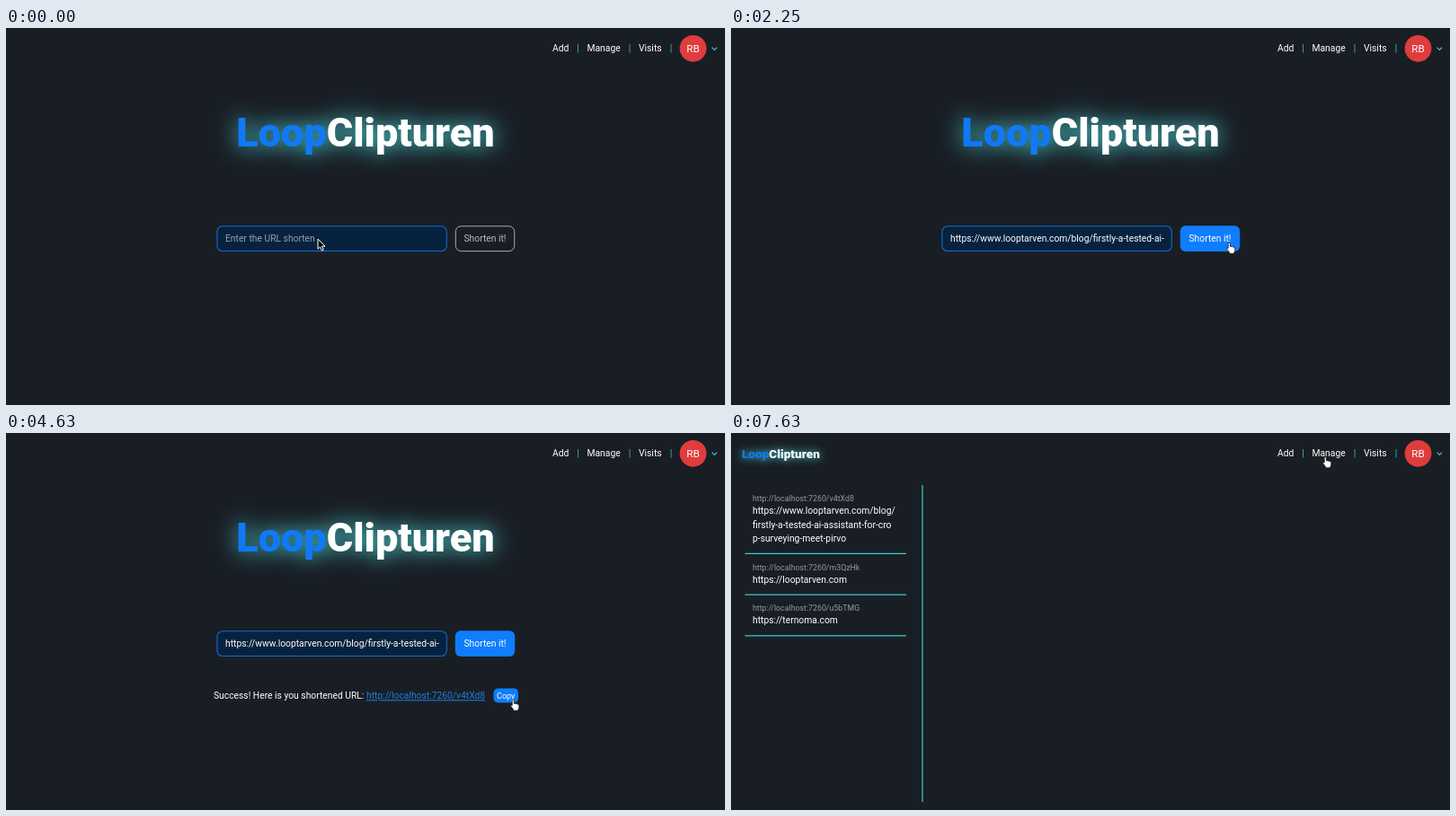
An HTML page for the animation above (8000 ms loop, 800 px wide and 420 px high).

```html
<!DOCTYPE html>
<html lang="en">
<head>
<meta charset="utf-8">
<title>Link shortener</title>
<style>
  html, body { margin: 0; width: 100%; height: 100%; overflow: hidden; background: #191e25; }
  svg { display: block; width: 800px; height: 420px; font: 10.3px Roboto, sans-serif; fill: #fff; }
  .logo { font-weight: 800; }
  .logo tspan { fill: #1179f8; }
  .teal { fill: #3cc8cc; }
  .line { stroke: #3cc8cc; stroke-width: 1.2; fill: none; }
  .small { font-size: 8.8px; fill: #949a9f; }
  .blue { fill: #0f7dfd; }
  .outlined { fill: none; stroke: #a9acb0; }
  .mid { text-anchor: middle; }
  #cursors path { stroke-linejoin: round; }
</style>
</head>
<body>
<svg viewBox="0 0 800 420">
  <defs><clipPath id="fieldClip"><rect x="243.5" y="222" width="238.5" height="25"/></clipPath></defs>

  <g id="nav">
    <text x="608" y="26.3">Add</text>
    <text x="646.5" y="26.3">Manage</text>
    <text x="704" y="26.3">Visits</text>
    <g class="teal mid">
      <text x="636.5" y="26">|</text><text x="694" y="26">|</text><text x="740" y="26">|</text>
    </g>
    <circle cx="764.5" cy="22.8" r="14.9" fill="#df3c3e"/>
    <text class="mid" x="764.5" y="26.9" font-size="11.6">RB</text>
    <path class="line" d="M785.5 21.7l2.8 2.8 2.8-2.8"/>
  </g>

  <g id="home">
    <text class="logo mid" x="400" y="132" font-size="45"
      style="filter:drop-shadow(0 0 12px #4fe6e6)"><tspan>Loop</tspan>Clipturen</text>

    <g id="field">
      <rect id="ring" x="233.7" y="219.7" width="257.6" height="29.6" rx="6.5" fill="none" stroke="#fff" stroke-width="1.6"/>
      <rect x="234.9" y="220.8" width="255.4" height="27.7" rx="6" fill="#07223e" stroke="#1869ca" stroke-width="1.1"/>
      <g clip-path="url(#fieldClip)">
        <text id="hint" x="244" y="238" fill="#93a2b1">Enter the URL shorten</text>
        <text id="urlStart" x="244" y="238"></text>
        <text id="urlEnd" x="481.5" y="238" text-anchor="end"></text>
      </g>
      <path id="caret" stroke="#fff" stroke-width=".8"/>
    </g>

    <g id="disabled">
      <rect class="outlined" x="500.3" y="220.8" width="65.4" height="27.8" rx="6"/>
      <text class="mid" x="533" y="238" fill="#b9bdc1">Shorten it!</text>
    </g>
    <g id="enabled">
      <rect class="blue" x="499.8" y="220.3" width="66.4" height="28.7" rx="6"/>
      <text class="mid" x="533" y="238">Shorten it!</text>
    </g>
    <g id="loading">
      <rect class="outlined" x="494.3" y="220.8" width="77.4" height="27.8" rx="6"/>
      <g id="dots" fill="#4fd0d6">
        <circle cx="524" cy="234.8"/><circle cx="533" cy="234.8"/><circle cx="542" cy="234.8"/>
      </g>
    </g>

    <g id="result">
      <text x="231" y="296.3">Success! Here is you shortened URL:</text>
      <text id="link" x="401" y="296.3" fill="#1c7fe0" text-decoration="underline"></text>
      <rect id="copyBox" x="542.5" y="284.5" height="16" rx="5"/>
      <text id="copyText" class="mid" y="295.8" font-size="9"></text>
    </g>
  </g>

  <g id="manage">
    <text class="logo" x="12" y="27.6" font-size="13.6"
      style="filter:drop-shadow(0 0 5px #4fe6e6)"><tspan>Loop</tspan>Clipturen</text>
    <path class="line" d="M213 58V411M15.5 134.3H195M15.5 180.2H195M15.5 225.8H195"/>
    <g id="list"></g>
  </g>

  <g id="cursors">
    <path id="arrow" d="M0 0V11.2L2.6 8.9 4.4 12.9 6.3 12 4.6 8.2H8Z" fill="#0b0b0d" stroke="#fff" stroke-width="1"/>
    <g id="ibeam" fill="none">
      <path d="M-3-6.3Q0-6.3.5-5Q1-6.3 4-6.3M.5-5V5.5M-3 6.8Q0 6.8.5 5.5Q1 6.8 4 6.8M-1.3 1H2.3" stroke="#111" stroke-width="2.2"/>
      <path d="M-3-6.3Q0-6.3.5-5Q1-6.3 4-6.3M.5-5V5.5M-3 6.8Q0 6.8.5 5.5Q1 6.8 4 6.8M-1.3 1H2.3" stroke="#ddd"/>
    </g>
    <path id="hand" transform="translate(-3 -.5)" fill="#fff" stroke="#111" stroke-width=".8"
      d="M3 .8c1 0 1.4.7 1.4 1.5V5c.5-.4 1.5-.4 1.9.3.6-.4 1.5-.2 1.8.5.8-.3 1.7.1 1.7 1.2v2.2c0 1.8-1.2 2-1.2 3.6H3.8C3.6 11 1.6 9.2.7 7.7c-.4-.9.7-1.5 1.5-.6V2.3C2.1 1.3 2.2.8 3 .8z"/>
  </g>
</svg>
<script>
const LOOP = 8000, STEP = 125;
const $ = id => document.getElementById(id);
const show = (id, on) => { $(id).style.display = on ? '' : 'none'; };
const set = (el, attrs) => { for (const k in attrs) el.setAttribute(k, attrs[k]); };

const host = 'http://localhost:7260/';
const base = 'https://www.looptarven.com/blog/';
const slug = 'firstly-a-tested-ai-assistant-for-crop-surveying-meet-pirvo';
$('urlStart').textContent = $('urlEnd').textContent = base + slug;
$('link').textContent = host + 'v4tXd8';

const row = (y, code, ...lines) =>
  `<text class="small" x="24" y="${y}">${host + code}</text>` +
  lines.map((s, i) => `<text x="24" y="${y + 14 + i * 15.6}">${s}</text>`).join('');
$('list').innerHTML =
  row(76, 'v4tXd8', base, slug.slice(0, 37), slug.slice(37)) +
  row(152.6, 'm3QzHk', 'https://looptarven.com') +
  row(198.3, 'u5bTMG', 'https://ternoma.com');

// Pointer path: time, x, y, shape from that time on
const path = [
  [0, 347, 235, 'arrow'], [125, 347, 236, 'ibeam'], [1500, 347, 236, 'ibeam'],
  [1875, 500, 238, 'hand'], [2125, 554, 239, 'hand'], [2375, 554, 239, 'arrow'],
  [2875, 554, 243, 'arrow'], [3000, 557, 247, 'arrow'], [3500, 571, 304, 'arrow'],
  [4250, 571, 304, 'arrow'], [4500, 565, 299, 'hand'], [4625, 564, 297, 'hand'],
  [4875, 564, 297, 'hand'], [5125, 570, 305, 'arrow'], [5750, 570, 305, 'arrow'],
  [6125, 640, 85, 'arrow'], [6250, 640, 85, 'arrow'], [6625, 661, 26.5, 'hand'],
  [LOOP, 661, 26.5, 'hand']
];

function drawPointer(t) {
  const i = path.findIndex(p => p[0] > t);
  const [t0, x0, y0, shape] = path[i - 1], [t1, x1, y1] = path[i];
  const k = (t - t0) / (t1 - t0);
  set($('cursors'), { transform: `translate(${x0 + (x1 - x0) * k} ${y0 + (y1 - y0) * k})` });
  for (const id of ['arrow', 'ibeam', 'hand']) show(id, id === shape);
}

function drawDots(t) {
  const swell = 1 - Math.abs((t - 2300) / 400 % 2 - 1);
  [...$('dots').children].forEach((dot, i) => {
    const k = i === 1 ? swell : 1 - swell;
    set(dot, { r: 1.8 + 1.2 * k, opacity: .5 + .5 * k });
  });
}

function draw(t) {
  const focused = t >= 375 && t < 2250, pasted = t >= 1000;
  const loading = t >= 2375 && t < 3750;
  const copied = t >= 5000 && t < 7000, managing = t >= 7500;

  show('home', !managing);
  show('manage', managing);
  show('ring', focused);
  show('hint', !pasted);
  show('urlEnd', pasted && focused);
  show('urlStart', pasted && !focused);
  show('caret', focused && (t - (pasted ? 1000 : 375)) % 1000 < 500);
  set($('caret'), { d: `M${pasted ? 481.7 : 244.2} 228.5v12` });
  set($('field'), { transform: `translate(${loading ? -6 : 0})` });
  show('disabled', !pasted);
  show('enabled', pasted && !loading);
  show('loading', loading);
  drawDots(t);

  show('result', t >= 3750);
  set($('result'), { transform: `translate(${copied ? -5 : 0})` });
  const width = copied ? 37.5 : 27.5;
  set($('copyBox'), { width, fill: copied ? '#099268' : '#0f7dfd' });
  set($('copyText'), { x: 542.5 + width / 2 });
  $('copyText').textContent = copied ? 'Copied' : 'Copy';
  drawPointer(t);
}

function tick() {
  const t = performance.now() % LOOP;
  draw(Math.floor(t / STEP) * STEP);
  requestAnimationFrame(tick);
}
tick();
</script>
</body>
</html>
```
